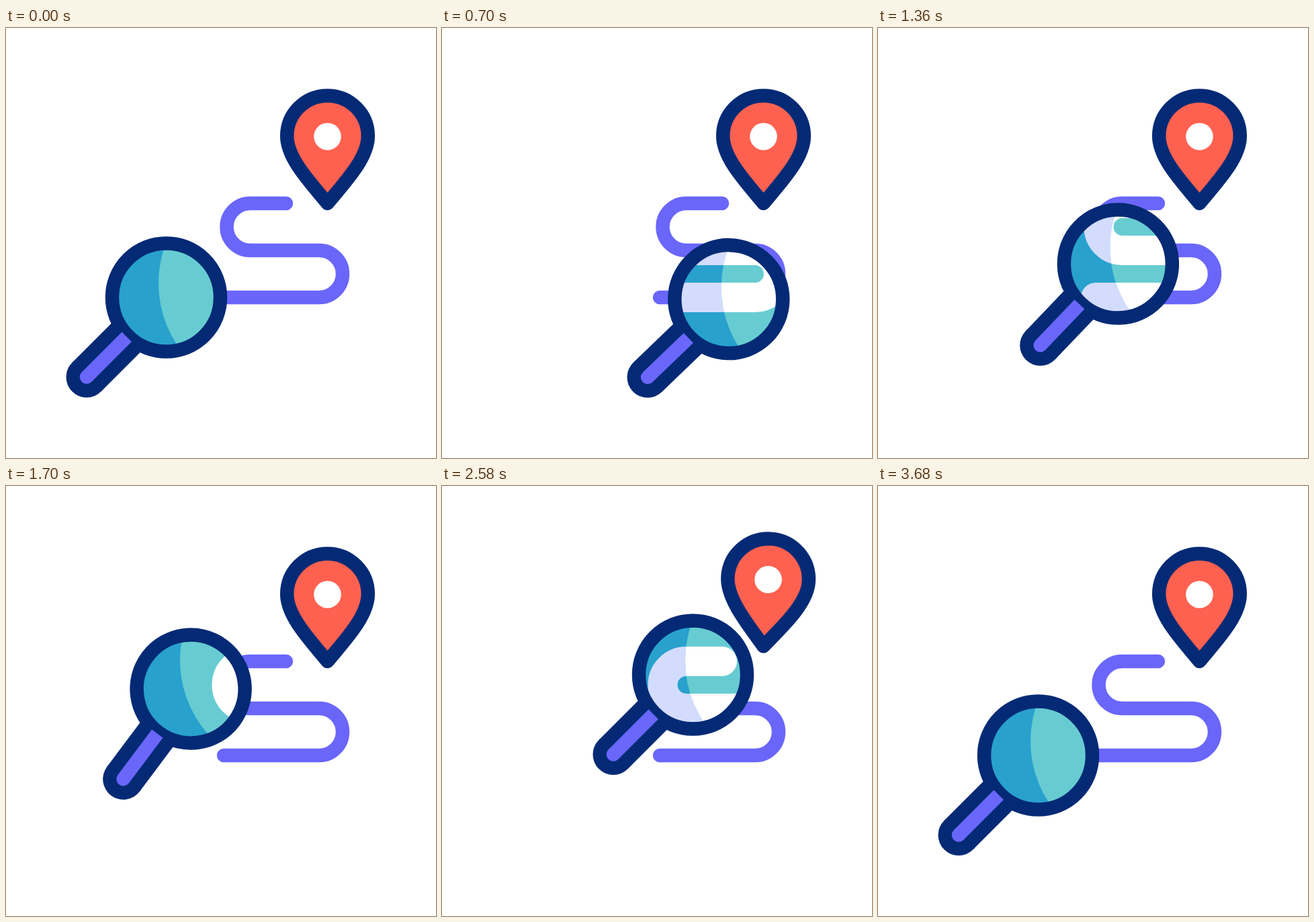
An HTML page with a canvas that plays this animation: 640x640 px, repeating every 4200 ms.

```html
<!DOCTYPE html>
<html lang="en">
<head>
<meta charset="utf-8">
<title>Route search</title>
<style>
  html, body { margin: 0; width: 100%; height: 100%; overflow: hidden; background: #fff; }
  canvas { display: block; width: 640px; height: 640px; }
</style>
</head>
<body>
<canvas id="stage" width="640" height="640"></canvas>
<script>
const ctx = document.getElementById('stage').getContext('2d');
const LOOP = 4200, STEP = 20, LINE = 20.5;
const NAVY = '#042a75', PURPLE = '#6a66fa', CORAL = '#ff6150';
const TEAL = '#67ccd1', BLUE = '#28a1cd', LAVENDER = '#d3dcfd', WHITE = '#fff';

const sine = u => (1 - Math.cos(Math.PI * u)) / 2;
const quad = u => u < 0.5 ? 2 * u * u : 1 - 2 * (1 - u) ** 2;
const mix = (a, b, u) => a + (b - a) * u;
const rad = deg => deg * Math.PI / 180;

// Each leg: end time, position, optional bend off the straight line, easing.
const moves = [
  { t: 0, x: 238.5, y: 401 },
  { t: 950, x: 463, y: 414, bend: [0, -15.3], ease: sine },
  { t: 1710, x: 275, y: 302, ease: sine },
  { t: 2290, x: 373.5, y: 281, ease: sine },
  { t: 2690, x: 373.5, y: 281, ease: sine },
  { t: 3680, x: 238.5, y: 401, bend: [4, 6], ease: quad }
];
const turns = [
  [0, 0], [475, -4.3], [950, 7.5], [1710, -8.2],
  [2290, 0], [2690, 0], [3190, 1.9], [3680, 0]
];

function lensPosition(t) {
  const i = moves.findIndex(m => m.t > t);
  if (i < 0) return moves[moves.length - 1];
  const a = moves[i - 1], b = moves[i];
  const e = b.ease((t - a.t) / (b.t - a.t));
  const [bx, by] = b.bend || [0, 0];
  const arch = 4 * e * (1 - e);
  return { x: mix(a.x, b.x, e) + bx * arch, y: mix(a.y, b.y, e) + by * arch };
}

function lensTurn(t) {
  const i = turns.findIndex(k => k[0] > t);
  if (i < 0) return 0;
  const [t0, a] = turns[i - 1], [t1, b] = turns[i];
  return mix(a, b, sine((t - t0) / (t1 - t0)));
}

function pinPose(t) {
  const start = 2080, peak = 2430, end = 2770;
  if (t <= start || t >= end) return { lift: 0, tilt: 0 };
  const u = t < peak ? (t - start) / (peak - start) : (end - t) / (end - peak);
  const tilt = -4.1 * Math.sin(2 * Math.PI * (t - start) / (end - start));
  return { lift: 38 * sine(u), tilt };
}

function disc(x, y, r, fill) {
  ctx.beginPath();
  ctx.arc(x, y, r, 0, 2 * Math.PI);
  ctx.fillStyle = fill;
  ctx.fill();
}

function stroke(color, width, cap = 'round') {
  ctx.strokeStyle = color;
  ctx.lineWidth = width;
  ctx.lineCap = cap;
  ctx.lineJoin = 'round';
  ctx.stroke();
}

function route(color, width) {
  ctx.beginPath();
  ctx.moveTo(324, 401);
  ctx.lineTo(466, 401);
  ctx.arc(466, 366, 35, Math.PI / 2, -Math.PI / 2, true);
  ctx.lineTo(363.5, 331);
  ctx.arc(363.5, 296, 35, Math.PI / 2, Math.PI * 1.5);
  ctx.lineTo(417, 261);
  stroke(color, width);
}

function pin(t) {
  const { lift, tilt } = pinPose(t);
  ctx.save();
  ctx.translate(478.5, 261 - lift);
  ctx.rotate(rad(tilt));
  ctx.beginPath();
  ctx.moveTo(0, 0);
  ctx.bezierCurveTo(-25.5, -31, -60.3, -67, -60.3, -100);
  ctx.arc(0, -100, 60.3, Math.PI, 0);
  ctx.bezierCurveTo(60.3, -67, 25.5, -31, 0, 0);
  ctx.closePath();
  ctx.fillStyle = CORAL;
  ctx.fill();
  stroke(NAVY, LINE);
  disc(0, -99.5, 20.3, WHITE);
  ctx.restore();
}

function handleLine(from, color, width) {
  const tip = 118.5;
  ctx.beginPath();
  ctx.moveTo(-tip, tip);
  ctx.lineTo(-from, from);
  stroke(color, width, 'butt');
  disc(-tip, tip, width / 2, color);
}

function magnifier(t) {
  const { x, y } = lensPosition(t), turn = rad(lensTurn(t));
  const showRoute = t > 0 && t < 3680;
  const toLens = () => { ctx.translate(x, y); ctx.rotate(turn); };

  ctx.save();
  toLens();
  handleLine(56, NAVY, 61);
  ctx.restore();

  ctx.save();
  ctx.beginPath();
  ctx.arc(x, y, 75, 0, 2 * Math.PI);
  ctx.clip();
  disc(x, y, 76, BLUE);
  if (showRoute) route(LAVENDER, 44);

  // Bright side of the glass
  ctx.save();
  toLens();
  ctx.beginPath();
  ctx.arc(154.5, -21, 166, 0, 2 * Math.PI);
  ctx.restore();
  ctx.clip();
  disc(x, y, 76, TEAL);
  if (showRoute) route(WHITE, 44);
  ctx.restore();

  ctx.save();
  toLens();
  ctx.beginPath();
  ctx.arc(0, 0, 80.5, 0, 2 * Math.PI);
  stroke(NAVY, LINE);
  handleLine(58.8, PURPLE, LINE);
  ctx.restore();
}

function draw(t) {
  ctx.fillStyle = WHITE;
  ctx.fillRect(0, 0, 640, 640);
  route(PURPLE, LINE);
  pin(t);
  magnifier(t);
}

const begin = performance.now();
function tick() {
  const t = (performance.now() - begin) % LOOP;
  draw(Math.floor(t / STEP) * STEP);
  requestAnimationFrame(tick);
}
tick();
</script>
</body>
</html>
```
